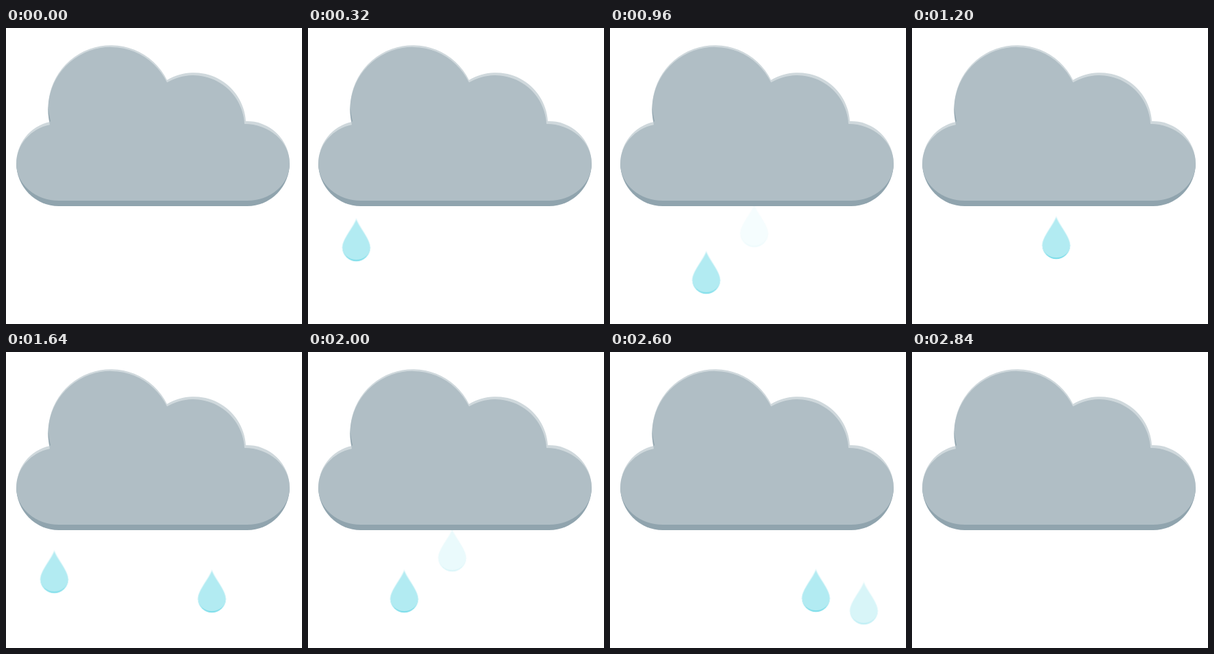
Write an HTML page without scripts that moves like this. It is 432 by 432 pixels and loops after 2.88 s.

```html
<!DOCTYPE html>
<html lang="en">
<head>
<meta charset="utf-8">
<title>Rain cloud</title>
<style>
  html, body { margin: 0; width: 100%; height: 100%; overflow: hidden; background: #fff; }
  svg { display: block; width: 100%; height: 100%; }

  /* One fall takes 620 ms of the 2880 ms loop */
  .drop {
    opacity: 0;
    animation: fall 2880ms ease-in-out var(--at) infinite,
               fade 2880ms ease-in-out var(--at) infinite;
  }
  @keyframes fall {
    0% { transform: translateY(0); }
    21.53%, 100% { transform: translateY(40px); }
  }
  @keyframes fade {
    0% { opacity: 0; }
    7.1%, 15.5% { opacity: 1; }
    21.53%, 100% { opacity: 0; }
  }

  /* The sky is empty where the loop joins */
  .rain { animation: gap 2880ms step-end infinite; }
  @keyframes gap {
    0% { visibility: hidden; }
    1.1% { visibility: visible; }
    98.4%, 100% { visibility: hidden; }
  }
</style>
</head>
<body>
<svg viewBox="0 0 432 432">
  <defs>
    <g id="drop">
      <path fill="#e0f7fa" d="M0 0C4 12 20.3 30 20.3 43H-20.3C-20.3 30-4 12 0 0Z"/>
      <path fill="#80deea" d="M-20.3 43A20.3 20.3 0 0 0 20.3 43Z"/>
      <path fill="#b2ebf2" d="M0 2.5C4 14 20.3 31 20.3 43A20.3 18 0 0 1-20.3 43C-20.3 31-4 14 0 2.5Z"/>
    </g>
  </defs>

  <g class="rain">
    <g transform="translate(70.5 256)">
      <use href="#drop" class="drop" style="--at: 0ms"/>
      <use href="#drop" class="drop" style="--at: 1206ms"/>
    </g>
    <g transform="translate(140.5 296)">
      <use href="#drop" class="drop" style="--at: 570ms"/>
      <use href="#drop" class="drop" style="--at: 1681ms"/>
    </g>
    <g transform="translate(210.5 256)">
      <use href="#drop" class="drop" style="--at: 909ms"/>
      <use href="#drop" class="drop" style="--at: 1926ms"/>
    </g>
    <g transform="translate(300.5 296)">
      <use href="#drop" class="drop" style="--at: 1321ms"/>
      <use href="#drop" class="drop" style="--at: 2290ms"/>
    </g>
    <g transform="translate(370.5 296)">
      <use href="#drop" class="drop" style="--at: 2069ms"/>
    </g>
  </g>

  <!-- Cloud: lit top edge, shaded base, body, shaded left side -->
  <path fill="#cfd8dc" d="M15 198A62 62 0 0 1 64 137A91.4 91.4 0 0 1 235 76A76 76 0 0 1 350 136A62 62 0 0 1 414 198Z"/>
  <path fill="#90a4ae" d="M15 197A62 63 0 0 0 77 260H352A62 63 0 0 0 414 197Z"/>
  <path fill="#b0bec5" d="M15 198A62 58 0 0 1 64 141.3A91.4 91.4 0 0 1 235 79.5A75 75 0 0 1 348 140A66 58 0 0 1 414 198A62 54 0 0 1 352 252H77A62 54 0 0 1 15 198Z"/>
  <path fill="#90a4ae" d="M61.5 115A92 92 0 0 0 63.7 137L65 136Q62.5 126 61.5 115Z"/>
</svg>
</body>
</html>
```
